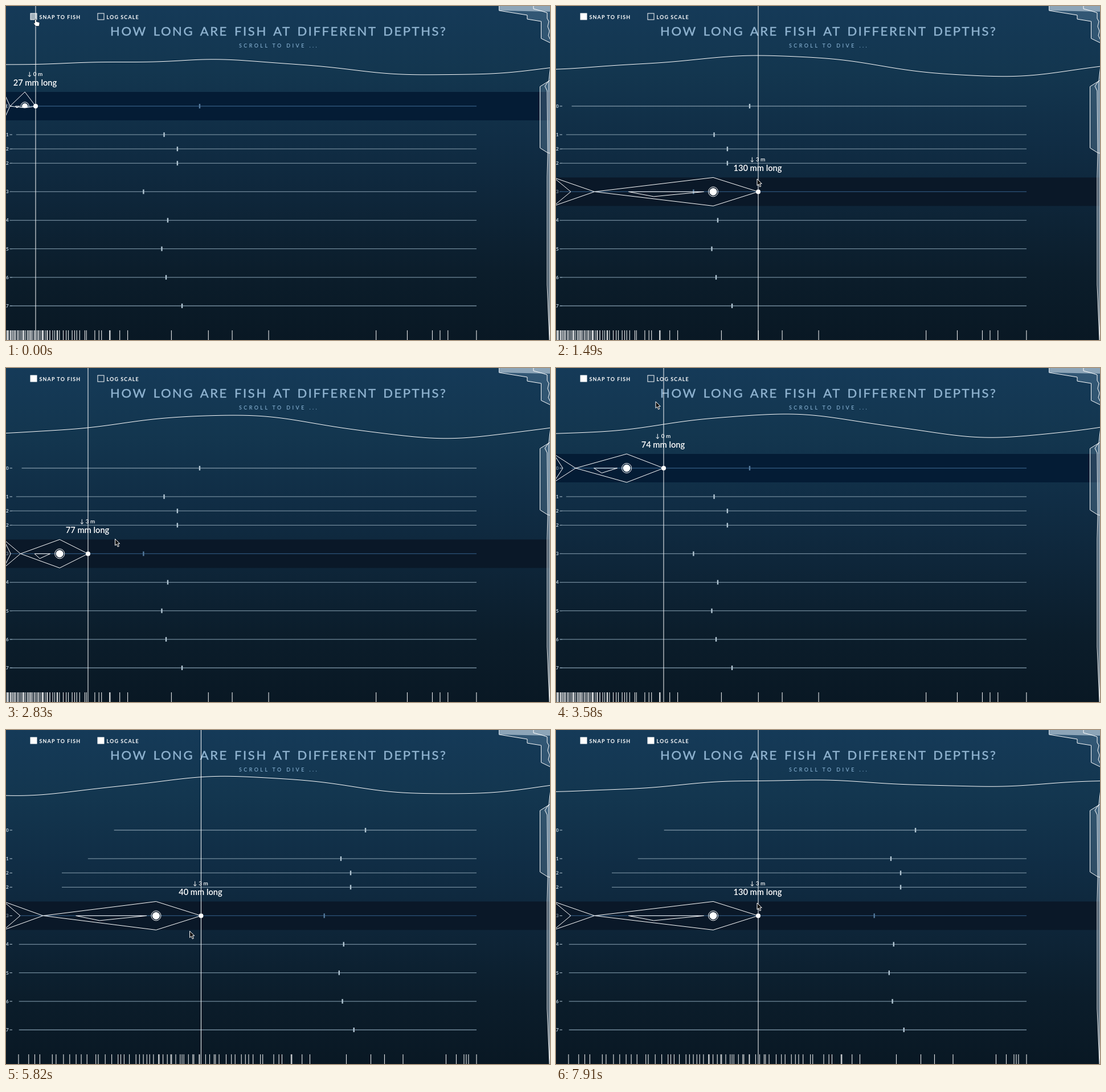
Recreate the animation shown at these times as an HTML page. Size 955 px wide and 587 px high, loop 8000 ms.

```html
<!DOCTYPE html>
<html lang="en">
<head>
<meta charset="utf-8">
<title>Fish lengths by depth</title>
<style>
  html, body { margin: 0; width: 100%; height: 100%; overflow: hidden; background: #0a1a27; }
  svg { display: block; width: 955px; height: 587px; }
  text { font-family: Lato, "Open Sans", sans-serif; fill: #fff; }
  .outline { fill: none; stroke: #fff; stroke-width: 1; }
  .mid { text-anchor: middle; }
  .title { font-size: 22px; letter-spacing: 2.6px; word-spacing: 3px; fill: #8fb3d0; stroke: #8fb3d0; stroke-width: .45; }
  .hint { font-size: 9px; font-weight: 600; letter-spacing: 3.4px; fill: #7fa9ca; }
  .option { font-size: 9px; font-weight: 700; letter-spacing: 1.1px; }
  .axis { font-size: 8px; font-weight: 700; fill: #c3d3de; }
</style>
</head>
<body>
<svg viewBox="0 0 955 587">
  <defs>
    <linearGradient id="sea" x1="0" y1="0" x2="0" y2="1">
      <stop offset="0" stop-color="#153a58"/>
      <stop offset=".2" stop-color="#13364f"/>
      <stop offset=".4" stop-color="#102d45"/>
      <stop offset=".58" stop-color="#0e263a"/>
      <stop offset=".8" stop-color="#0b1d2b"/>
      <stop offset="1" stop-color="#091824"/>
    </linearGradient>
    <clipPath id="bodyClip"><path id="clipShape"/></clipPath>
  </defs>
  <rect width="955" height="587" fill="url(#sea)"/>
  <rect id="band" width="955" height="50"/>

  <g stroke="#fff" fill="#7ea0bd" fill-opacity=".28" stroke-linejoin="round">
    <path d="M865.500 -2V8L915 16V23L939.500 27V57L956 65V-2Z"/>
    <path d="M865 0H955V10L865 8Z" fill="#c6d6e2" fill-opacity=".62" stroke="none"/>
    <path d="M926 -1V5L941 9L950 12V22L953 27L951 36L954 44L952 52L956 60" fill="none"/>
    <path d="M956 130L937.500 141.500V249.500L951 258L956 259Z"/>
    <path d="M956 104L953 131L946 141L950 149L951 258L950 300V490L954 588H956Z"/>
    <path d="M953 131L953.500 300V520L955 588" fill="none"/>
  </g>

  <g id="rows"></g>
  <path id="ticks" stroke="#fff" stroke-width="1.1" stroke-opacity=".9"/>
  <path id="wave" class="outline"/>

  <text class="mid title" x="478.800" y="52">HOW LONG ARE FISH AT DIFFERENT DEPTHS?</text>
  <text class="mid hint" x="479" y="73">SCROLL TO DIVE ...</text>
  <g fill="#fff" stroke="#fff">
    <rect id="snapBox" x="43" y="13" width="11" height="11"/>
    <rect id="logBox" x="161" y="13" width="11" height="11"/>
  </g>
  <text class="option" x="58.500" y="22.500">SNAP TO FISH</text>
  <text class="option" x="176.500" y="22.500">LOG SCALE</text>

  <path id="fish" class="outline" stroke-linejoin="round"/>
  <g clip-path="url(#bodyClip)">
    <circle id="ring" class="outline"/>
    <circle id="eye" fill="#fff"/>
  </g>
  <path id="rule" class="outline"/>
  <circle id="nose" r="4" fill="#fff"/>
  <text id="depth" class="mid" font-size="10" font-weight="600"></text>
  <text id="length" class="mid" font-size="14.700" font-weight="600"></text>

  <g id="cursor" stroke-linejoin="round">
    <path id="arrow" d="M0 0V11.500L2.700 9.100L4.700 13.700L6.800 12.800L4.800 8.300H8.400Z" fill="#111" stroke="#fff"/>
    <path id="hand" d="M-1.500 1Q0 -1 1.300 1V4.500L6 5.500Q7.300 6 7 8L6 12.500H0L-3.500 7.800Q-4 6 -1.500 7Z" fill="#fff" stroke="#10202e" stroke-width=".8"/>
  </g>
</svg>

<script>
const LOOP = 8000, FRAME = 149.25, MAX_MM = 292.3, LOG_CLICK = 4300;
const $ = id => document.getElementById(id);
const set = (el, attrs) => { for (const k in attrs) el.setAttribute(k, attrs[k]); };
const clamp = (v, a, b) => Math.min(b, Math.max(a, v));
const mix = (a, b, p) => a + (b - a) * p;
const ease = p => { p = clamp(p, 0, 1); return p * p * (3 - 2 * p); };

const linear = mm => -26.7 + 2.917 * mm;
const log = mm => 826 + 231 * Math.log(mm / MAX_MM);
const unlog = x => MAX_MM * Math.exp((x - 826) / 231);

let seed = 11;
const random = () => (seed = seed * 16807 % 2147483647) / 2147483647;

// a dense shoal, thickest mid-scale, then a few long fish
const SHOAL = 61;
const fishes = [597.5, 640.5, 664.5, 697, 772.5, 790.5, 804, 808, 812, 826].map(unlog);
for (let i = 0; i < SHOAL; i++) {
  const q = (i + random()) / SHOAL;
  const bulge = .06 * Math.sin(2 * Math.PI * q) + .03 * Math.sin(Math.PI * q);
  fishes.push(unlog(mix(22, 534, q + bulge)));
}

const means = [125.7, 104.3, 112.3, 112.3, 91.9, 106.5, 102.9, 105.5, 115.1];
const rows = means.map((mean, i) => {
  const slot = i < 2 ? i * 2 : i < 4 ? i + 1 : i * 2 - 2;
  const depth = Math.round(slot / 2);
  return { mean, depth, y: 176 + slot * 25.07, min: depth < 3 ? 18.6 * .82 ** depth : 9.03 };
});

// time, cursor x, cursor y, nose x, row, length (mm)
const moves = [
  [0, 52, 23, 52, 0, 27],
  [1490, 353, 304, 355, 4, 130],
  [2830, 191.5, 300.5, 144, 4, 77],
  [3580, 175, 59, 189, 0, 74],
  [4180, 167, 20, 168, 0, 66],
  [5080, 245, 235, 223.5, 0, 21],
  [6420, 379, 439.5, 429, 7, 54],
  [7910, 54, 18, 53, 0, 10]
];

function pose(t) {
  const i = clamp(moves.findIndex(m => m[0] > t), 1, moves.length - 1) || 1;
  const a = moves[i - 1], b = moves[i];
  const p = ease((t - a[0]) / (b[0] - a[0]));
  return a.map((v, k) => mix(v, b[k], p));
}

// one long swell that grows and fades while both ends drift
function surface(x, u) {
  const height = 21 - 43 * (u - .42) ** 2;
  const crest = 365 + 50 * u;
  const left = (24 * u - 18) * (1 - ease(x / 320));
  const right = -9 * u * ease((x - 650) / 300);
  const ripple = .8 * Math.sin(x / 33 + 9 * u);
  return 108 - 13 * u - height * Math.cos((x - crest) * Math.PI / 400) + left + right + ripple;
}

function wavePath(u) {
  const points = [];
  for (let x = 0; x <= 960; x += 8) points.push(`${x} ${surface(x, u).toFixed(2)}`);
  return 'M' + points.join('L');
}

$('rows').innerHTML = rows.map(r =>
  `<g><text class="axis" x="0" y="${r.y + 2.8}">${r.depth}</text>` +
  `<path d="M6.500 ${r.y}H11" stroke="#b4c7d4"/><path class="line" stroke-width="1.300"/>` +
  `<path class="mean" stroke-width="2.400"/></g>`).join('');
for (const [i, g] of [...$('rows').children].entries()) {
  rows[i].label = g.querySelector('text');
  rows[i].line = g.querySelector('.line');
  rows[i].mark = g.querySelector('.mean');
}

function bandColor(depth) {
  const p = Math.min(1, depth / 3), q = Math.max(0, (depth - 3) / 4);
  return `rgb(${mix(4, 10, p) - 4 * q},${mix(28, 24, p) - 6 * q},${mix(53, 40, p) - 12 * q})`;
}

function drawFish(x, y) {
  const tip = -4.2, size = x - tip;
  const along = p => tip + p * size;
  const joint = along(.2), notch = along(.084);
  const peak = x - Math.min(79, .42 * (x - joint));
  const belly = clamp(3 + (size - 57) * .42, 3, 25);
  const r = clamp(size / 11, 5, 6.5);
  const finA = along(.366), finB = peak - clamp(size * .16, 9, 16.5);
  const body = `M${joint} ${y}L${peak} ${y - 25}L${x} ${y}L${peak} ${y + belly}Z`;
  const tail = `M${joint} ${y}L${tip} ${y - 25}L${notch} ${y}L${tip} ${y + 25}Z`;
  const fin = `M${finA} ${y}H${finB}L${mix(finA, finB, .335)} ${y + Math.min(8.5, belly)}Z`;
  set($('fish'), { d: body + tail + fin });
  set($('clipShape'), { d: body });
  set($('eye'), { cx: peak, cy: y, r });
  set($('ring'), { cx: peak, cy: y, r: r + 2 });
  set($('nose'), { cx: x, cy: y });
  set($('rule'), { d: `M${x} 0V587` });
}

function draw(t) {
  const [, cx, cy, x, row, mm] = pose(t);
  const toLog = ease((t - LOG_CLICK) / 600);
  const scale = v => mix(linear(v), log(v), toLog);
  const active = rows[Math.round(row)];
  const { y, depth } = active;

  set($('band'), { y: y - 25, fill: bandColor(depth) });
  for (const r of rows) {
    const on = r === active;
    set(r.line, { d: `M${Math.max(7, scale(r.min))} ${r.y}H826`, stroke: on ? '#2c5379' : '#71899a' });
    set(r.mark, { d: `M${scale(r.mean)} ${r.y - 4}v8`, stroke: on ? '#557b9e' : '#b2c6d3' });
    set(r.label, { opacity: on ? .6 : 1 });
  }
  set($('ticks'), { d: fishes.map(v => `M${scale(v).toFixed(1)} 570V587`).join('') });
  set($('wave'), { d: wavePath(t / LOOP) });

  drawFish(x, y);
  set($('depth'), { x: x - 1, y: y - 53.5 });
  set($('length'), { x: x - 1, y: y - 36 });
  $('depth').textContent = `↓ ${depth} m`;
  $('length').textContent = `${Math.round(mm)} mm long`;

  const hand = cy < 28 && cx < 180;
  set($('snapBox'), { 'fill-opacity': hand && cx < 80 ? .6 : 1 });
  set($('logBox'), { 'fill-opacity': clamp((t - LOG_CLICK) / 920, 0, 1) });
  set($('cursor'), { transform: `translate(${cx} ${cy})` });
  set($('arrow'), { visibility: hand ? 'hidden' : 'visible' });
  set($('hand'), { visibility: hand ? 'visible' : 'hidden' });
}

const start = performance.now();
function tick() {
  const t = (performance.now() - start) % LOOP;
  draw(Math.min(7910, Math.floor((t + 6) / FRAME) * FRAME));
  requestAnimationFrame(tick);
}
tick();
</script>
</body>
</html>
```
